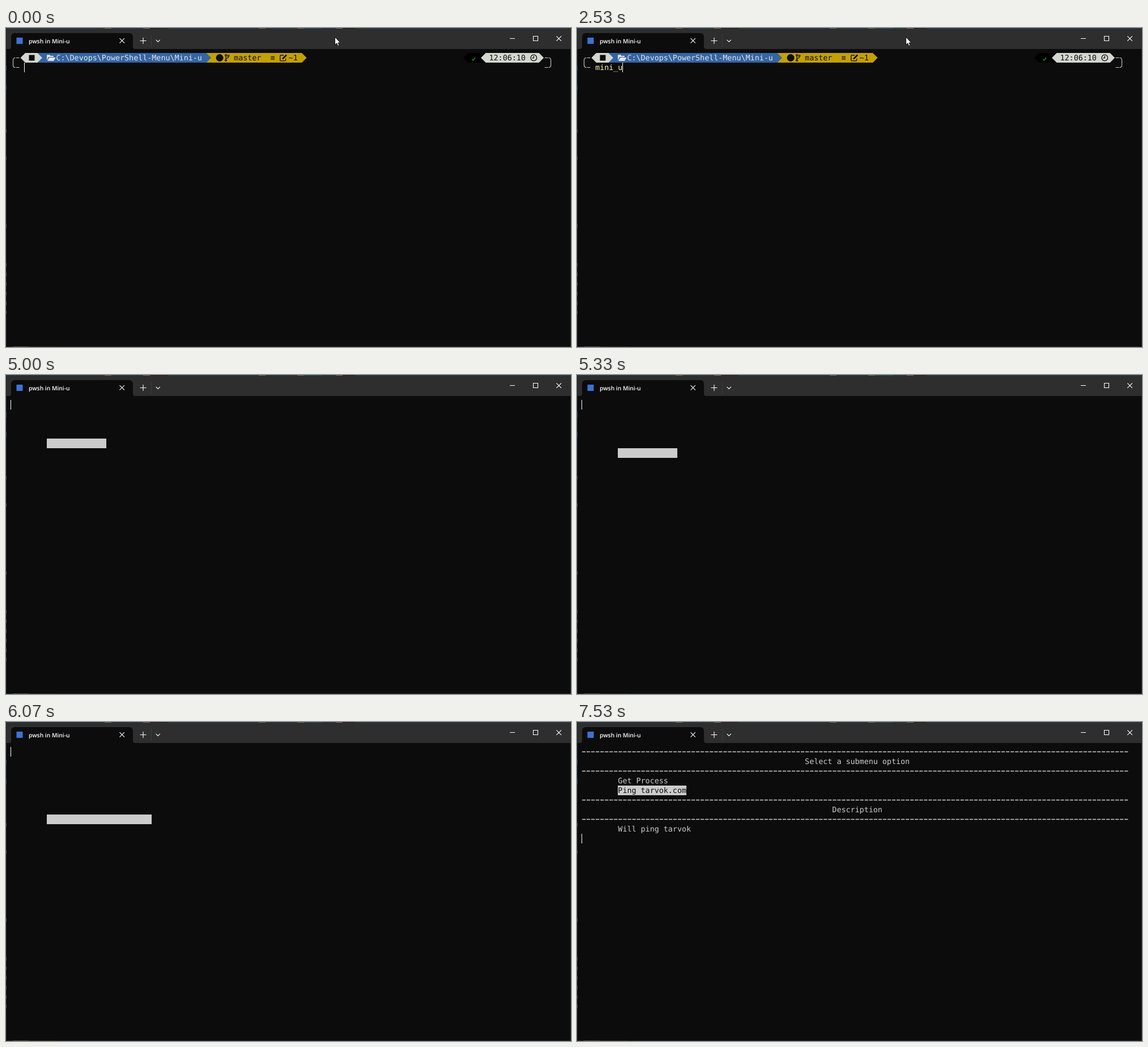
Write an HTML page that moves like this. It is 997 px wide and 562 px high and loops after 8000 ms.

```html
<!DOCTYPE html>
<html lang="en">
<head>
<meta charset="utf-8">
<title>Terminal menu</title>
<style>
  html, body { margin: 0; width: 100%; height: 100%; overflow: hidden; background: #0c0c0c; }
  svg { display: block; }
  .mono { font: 13.36px "DejaVu Sans Mono", monospace; white-space: pre; text-rendering: geometricPrecision; }
  .tab { font: 600 10.3px "Open Sans", "Noto Sans", sans-serif; fill: #fff; text-rendering: geometricPrecision; }
  .line { fill: none; stroke: #fff; stroke-width: 1.1; }
  .frame { fill: none; stroke: #ccc; stroke-width: 1.1; }
  .ink { fill: none; stroke: #0c0c0c; stroke-width: 1.3; }
  .rule { stroke: #ccc; stroke-width: 1.3; stroke-dasharray: 6.3 1.743; }
</style>
</head>
<body>
<svg width="997" height="562" viewBox="0 0 997 562">
  <rect width="997" height="562" fill="#0c0c0c"/>
  <rect width="997" height="37" fill="#2e2e2e"/>
  <g id="edges"></g>

  <!-- tab and window buttons -->
  <path d="M5 37Q9 37 9 33V16Q9 9 16 9H217Q224 9 224 16V33Q224 37 228 37Z" fill="#0c0c0c"/>
  <rect x="18.5" y="17" width="11" height="11" fill="#3b73d6"/>
  <text class="tab" x="40" y="26.8">pwsh in Mini-u</text>
  <path class="line" d="M200.5 18.2l8.4 8.4m0-8.4l-8.4 8.4"/>
  <path class="line" d="M236.5 22.5h11m-5.5-5.5v11" stroke-width="1.3"/>
  <path d="M256.5 12v21" stroke="#3c3c3c"/>
  <path class="line" d="M264.6 20.8l3.6 3.6 3.6-3.6"/>
  <path class="line" d="M889 18.5h9M930.5 14.5h8v8h-8zM971.3 14.3l8.6 8.6m0-8.6l-8.6 8.6"/>

  <g id="prompt">
    <path class="frame" d="M16.5 52.5Q12.5 52.5 12.5 56.5V65.5Q12.5 69.5 16.5 69.5M17.8 52.5H23.5M17.8 69.5H23.5"/>
    <path class="frame" d="M957.5 52.5Q961.5 52.5 961.5 56.5V65.5Q961.5 69.5 957.5 69.5M950.5 52.5H956.5M950.5 69.5H956.5"/>
    <path d="M354 44H522L530.5 52.5 522 61H354Z" fill="#c4a000"/>
    <path d="M56 44H353.5L362 52.5 353.5 61H56Z" fill="#3465a4"/>
    <path d="M34 44H55.5L64 52.5 55.5 61H34L25.5 52.5Z" fill="#d3d7cf"/>
    <path d="M815 44H846V61H815L806.5 52.5Z" fill="#000"/>
    <path d="M846.5 44H940.5L949 52.5 940.5 61H846.5L838 52.5Z" fill="#d3d7cf"/>
    <rect x="40.5" y="47.5" width="10" height="10" fill="#0c0c0c"/>
    <path d="M72 57V48.5Q72 47.3 73.2 47.3H77L78.5 49H83Q84 49 84 50.2V51H76.2Q75 51 74.4 52ZM73 58L75.8 52.8Q76.2 52 77 52H87.5L84.6 57.2Q84.2 58 83.3 58Z" fill="#e4e4e4"/>
    <circle cx="377" cy="52.5" r="6.5" fill="#0c0c0c"/>
    <g class="ink">
      <path d="M388 49.5V55.5M392.5 50.5Q392.5 53 388 53.8"/>
      <circle cx="388" cy="48" r="1.4"/><circle cx="388" cy="57" r="1.4"/><circle cx="392.5" cy="49" r="1.4"/>
      <path d="M490 48H485Q483.7 48 483.7 49.3V56.5Q483.7 57.8 485 57.8H492.3Q493.6 57.8 493.6 56.5V54"/>
      <path d="M488 54.5L495 47.5" stroke-width="2.6"/>
      <circle cx="931.2" cy="52.5" r="5.3"/><path d="M931.2 49V52.9H928.3"/>
    </g>
    <path d="M822.3 54.8L824.3 57 828 52.2" fill="none" stroke="#13a10e" stroke-width="1.4"/>
    <g id="promptText"></g>
    <path d="M580.5 16V29.5L583.6 26.7 585.7 31.4 587.9 30.4 585.8 25.9H589.8Z" fill="#fff" stroke="#000" stroke-width=".8"/>
  </g>
  <g id="screen"></g>
</svg>
<script>
const CELL = 8.043, ROW = 17, LEFT = 8, TOP = 44, LOOP = 8000;
const GREY = '#cccccc', DARK = '#0c0c0c';
const $ = id => document.getElementById(id);
const colX = c => LEFT + c * CELL;
const rowY = r => TOP + r * ROW;

const rect = (x, y, w, h, fill) => `<rect x="${x}" y="${y}" width="${w}" height="${h}" fill="${fill}"/>`;
const text = (c, r, s, fill = GREY) =>
  `<text class="mono" x="${colX(c)}" y="${rowY(r) + 13.3}" fill="${fill}">${s}</text>`;
const bar = (c, r) => rect(Math.floor(colX(c)), rowY(r), 1, ROW, '#fff');
const block = (r, s) => rect(72, rowY(r), Math.round(s.length * CELL), ROW, GREY);
const rule = r => `<path class="rule" d="M${LEFT + .9} ${rowY(r) + 8.5}H973"/>`;

const mainMenu = {
  title: 'Main Menu', col: 57,
  items: [
    ['Administrative_Tasks', 'A collection of tasks performed by site adminstrators.'],
    ['General_Tasks', 'A collection of general tasks performed by site operators and engineers.'],
    ['Nuclear_Tasks', 'A collection of tasks to be run with great care.'],
    ['Play_With_Puppies', 'Play with the puppies.'],
    ["Don't_Play_With_Puppies", 'Do not play with the puppies.'],
    ['Test Running Code', 'For running additonal code tests using powershell script block from json']
  ]
};
const subMenu = {
  title: 'Select a submenu option', col: 49,
  items: [
    ['Get Process', 'Will get a list of processes'],
    ['Ping tarvok.com', 'Will ping tarvok']
  ]
};

function menu({ title, col, items }, pick, cursor) {
  const end = 3 + items.length;
  const list = items.map(([name], i) => i === pick
    ? block(3 + i, name) + text(8, 3 + i, name, DARK)
    : text(8, 3 + i, name));
  return rule(0) + text(col, 1, title) + rule(2) + list.join('') +
    rule(end) + text(55, end + 1, 'Description') + rule(end + 2) +
    text(8, end + 3, items[pick][1]) + (cursor ? bar(0, end + 4) : '');
}
const typed = (s, cursor) => text(3, 1, s, '#f9f1a5') + (cursor ? bar(3 + s.length, 1) : '');
const cleared = pick => bar(0, 0) + (pick === undefined ? '' : block(3 + pick, mainMenu.items[pick][0]));

// [start in ms, screen content]
const steps = [
  [0, typed('', true)],
  [470, typed('', false)],
  [1000, typed('', true)],
  [1530, typed('', false)],
  [2070, typed('', true)],
  [2130, typed('min', true)],
  [2530, typed('mini_u', true)],
  [3130, cleared()],
  [3200, menu(mainMenu, 0, true)],
  [3800, menu(mainMenu, 0, false)],
  [4400, menu(mainMenu, 0, true)],
  [4670, menu(mainMenu, 1, true)],
  [5000, cleared(1)],
  [5070, menu(mainMenu, 2, true)],
  [5330, cleared(2)],
  [5400, menu(mainMenu, 3, true)],
  [5670, cleared(3)],
  [5730, menu(mainMenu, 4, true)],
  [6070, cleared(4)],
  [6130, menu(mainMenu, 5, true)],
  [6730, menu(mainMenu, 5, false)],
  [6800, menu(subMenu, 0, true)],
  [7470, menu(subMenu, 0, false)],
  [7530, menu(subMenu, 1, true)]
];

$('promptText').innerHTML =
  text(10, 0, 'C:\\Devops\\PowerShell-Menu\\Mini-u', '#e4e4e4') +
  text(49, 0, 'master', DARK) + text(57, 0, '≡', DARK) + text(61, 0, '~1', DARK) +
  text(105, 0, '12:06:10', DARK);

// thin window border with traces of what lies behind it
$('edges').innerHTML =
  rect(0, 0, 997, 1, '#1a4353') + rect(0, 0, 1, 562, '#18262e') +
  rect(996, 0, 1, 562, '#1b3540') + rect(0, 561, 997, 1, '#1b2d35') +
  [174, 242, 446, 514, 582].map(x => rect(x, 0, 12, 1, '#7d7466')).join('') +
  rect(254, 0, 31, 1, '#2a1d1a') + rect(527, 0, 31, 1, '#176468') + rect(594, 0, 22, 1, '#2a1d1a') +
  [66, 100].map(y => rect(0, y, 1, 9, '#1f4f80')).join('') +
  [178, 226, 346, 414, 431, 448, 465, 482, 498].map(y => rect(0, y, 1, 6, '#53595c')).join('') +
  rect(12, 561, 28, 1, '#555') + rect(40, 561, 48, 1, '#333');

const start = performance.now();
let shown = -1;
function draw() {
  const t = (performance.now() - start) % LOOP;
  const now = steps.findLastIndex(([at]) => at <= t);
  if (now !== shown) {
    shown = now;
    $('screen').innerHTML = steps[now][1];
    $('prompt').style.display = t < 3130 ? '' : 'none';
  }
  requestAnimationFrame(draw);
}
draw();
</script>
</body>
</html>
```
